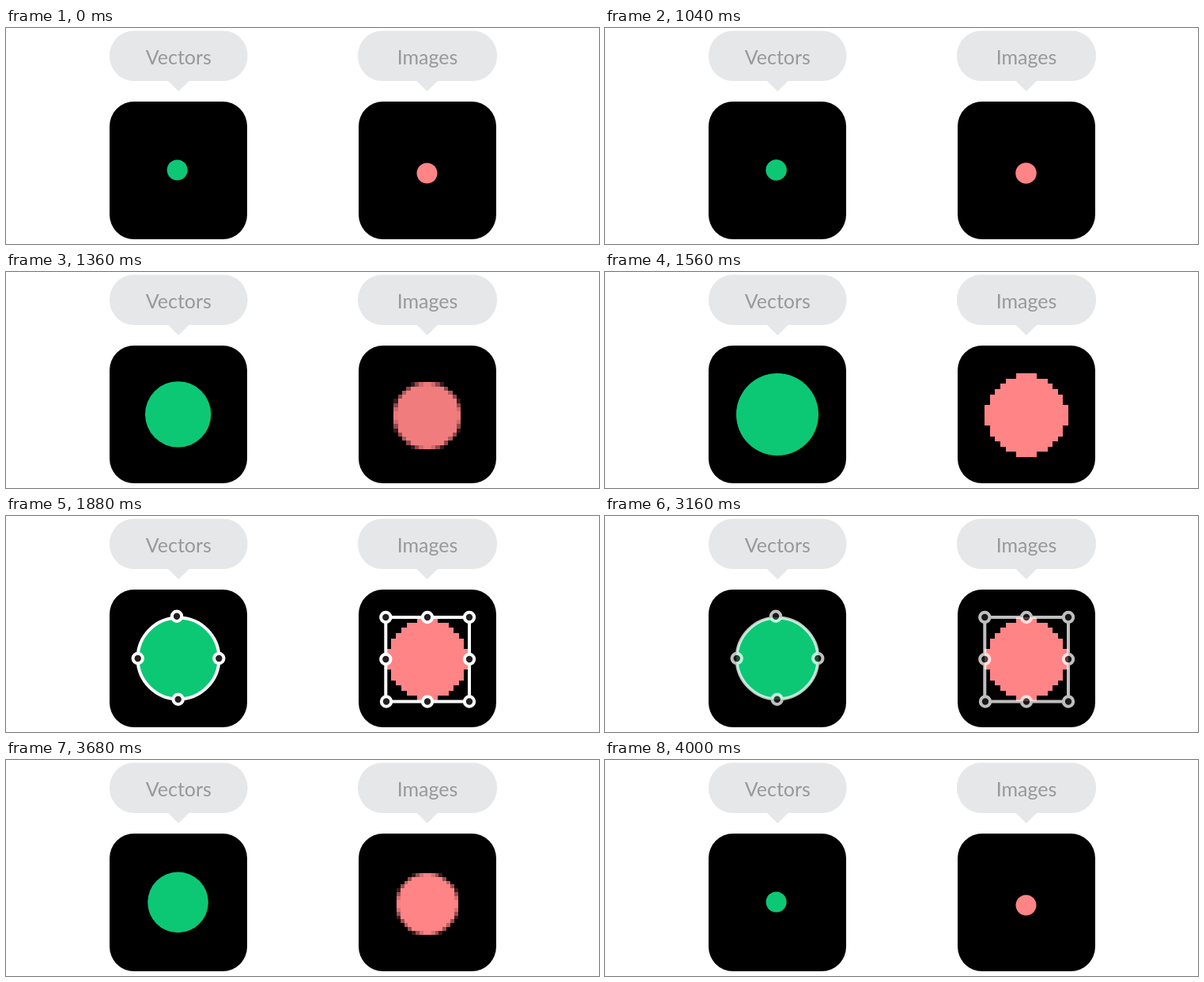
An HTML page with a canvas for the animation above (5040 ms loop, 750 px wide and 273 px high).

```html
<!DOCTYPE html>
<html lang="en">
<head>
<meta charset="utf-8">
<title>Vectors and images</title>
<style>
  html, body { margin: 0; width: 100%; height: 100%; overflow: hidden; background: #fff; }
  svg, canvas { position: absolute; left: 0; top: 0; width: 750px; height: 273px; }
  text { font: 25px Lato, "Open Sans", sans-serif; fill: #97999b; text-anchor: middle; }
</style>
</head>
<body>
<svg viewBox="0 0 750 273">
  <g fill="#e6e7e9">
    <rect x="131" y="3.5" width="174.5" height="63.5" rx="31"/>
    <path d="M204.500 66.500h27.500l-13.700 13.500z"/>
    <rect x="445" y="3.500" width="176" height="63.500" rx="31"/>
    <path d="M519 66.500h27.500l-13.700 13.500z"/>
  </g>
  <rect x="131" y="93" width="174" height="174" rx="31"/>
  <rect x="446" y="93" width="174" height="174" rx="31"/>
  <text x="218.300" y="45.500">Vectors</text>
  <text x="533" y="45.500">Images</text>
</svg>
<canvas id="stage" width="750" height="273"></canvas>
<script>
const LOOP = 5040, STEP = 40, CELLS = 16;
const GREEN = '#0cc875', RED = '#ff8486';
const ctx = document.getElementById('stage').getContext('2d');

const clamp = v => Math.min(1, Math.max(0, v));
const lerp = (a, b, k) => a + (b - a) * k;
const ramp = (t, from, to) => clamp((t - from) / (to - from));
const ease = k => k < 0.5 ? 2 * k * k : 1 - 2 * (1 - k) ** 2;

// Low-resolution disc; alphaAt maps distance from the centre to opacity.
function makeSprite(alphaAt) {
  const sprite = document.createElement('canvas');
  sprite.width = sprite.height = CELLS;
  const c = sprite.getContext('2d');
  c.fillStyle = RED;
  for (let y = 0; y < CELLS; y++) {
    for (let x = 0; x < CELLS; x++) {
      c.globalAlpha = alphaAt(Math.hypot(x - 7.5, y - 7.5));
      c.fillRect(x, y, 1, 1);
    }
  }
  return sprite;
}
const soft = makeSprite(d => clamp(8.5 - d));
const hard = makeSprite(d => d <= 7.75 ? 1 : 0);

function disc(x, y, r, color) {
  ctx.fillStyle = color;
  ctx.beginPath();
  ctx.arc(x, y, r, 0, 2 * Math.PI);
  ctx.fill();
}

function drawImageDisc(x, y, r, mix) {
  if (r < 20) return disc(x, y, r, RED);
  ctx.imageSmoothingEnabled = false;
  for (const [sprite, alpha] of [[soft, 1 - mix], [hard, mix]]) {
    ctx.globalAlpha = alpha;
    ctx.drawImage(sprite, x - r, y - r, 2 * r, 2 * r);
  }
  ctx.globalAlpha = 1;
}

const knobs = [
  [216, 126.7], [269.3, 180], [217.7, 231.7], [166.7, 180],
  [480.3, 128], [533, 128], [586, 128], [480.3, 181], [586, 181],
  [481, 234.5], [533, 234.5], [586, 234.5]
];

// Drawn on its own layer so that overlapping lines fade as one.
const overlay = document.createElement('canvas');
overlay.width = 750;
overlay.height = 273;
{
  const c = overlay.getContext('2d');
  c.strokeStyle = '#fff';
  c.fillStyle = '#231f20';
  c.lineWidth = 4;
  c.beginPath();
  c.arc(218, 180, 51.5, 0, 2 * Math.PI);
  c.stroke();
  c.strokeRect(480.3, 128, 105.7, 106.5);
  for (const [x, y] of knobs) {
    c.beginPath();
    c.arc(x, y, 6.2, 0, 2 * Math.PI);
    c.fill();
    c.stroke();
  }
}

function draw(time) {
  const t = Math.floor((time % LOOP) / STEP) * STEP;
  const size = ease(ramp(t, 1010, 1560)) - ease(ramp(t, 3450, 4000));
  const mix = ease(ramp(t, 1320, 1560)) - ease(ramp(t, 3440, 3680));
  const lines = ramp(t, 1720, 1880) - ramp(t, 3120, 3280);

  ctx.clearRect(0, 0, 750, 273);
  disc(lerp(216.6, 218, size), lerp(179.5, 180, size), lerp(13, 52, size), GREEN);
  drawImageDisc(lerp(532.5, 533, size), lerp(183.5, 181, size), lerp(13, 53, size), mix);
  ctx.globalAlpha = clamp(lines);
  ctx.drawImage(overlay, 0, 0);
  ctx.globalAlpha = 1;
}

const start = performance.now();
function tick() {
  draw(performance.now() - start);
  requestAnimationFrame(tick);
}
tick();
</script>
</body>
</html>
```
